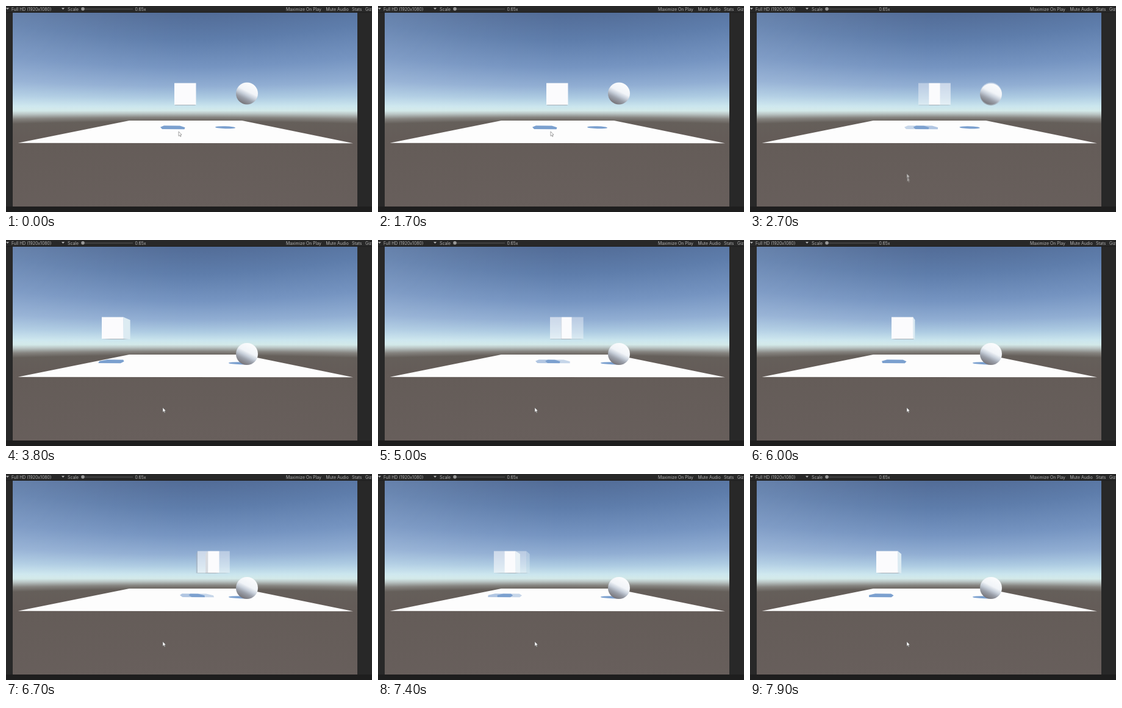
Animation of 600x338 px, one loop 8 s. Source, as an HTML page with a canvas:

```html
<!DOCTYPE html>
<html lang="en">
<head>
<meta charset="utf-8">
<title>Cube and ball</title>
<style>
html, body { margin: 0; width: 100%; height: 100%; overflow: hidden; background: #282828; }
canvas { display: block; width: 600px; height: 338px; }
</style>
</head>
<body>
<canvas id="stage" width="600" height="338"></canvas>
<script>
const view = document.getElementById('stage').getContext('2d');
const buffer = document.createElement('canvas');
buffer.width = 600;
buffer.height = 338;
const ctx = buffer.getContext('2d');

const LOOP = 8000, STEP = 100, START = 2600;
const EYE = { x: 293.5, y: 170 };
const SHADOW = '#7ba0cf';

// [time, cube offset from the middle]
const cubePath = [[START, 0], [2830, 40], [3780, -119], [3800, -119], [4760, 52], [5000, 6],
  [5640, -103], [6000, -44], [6590, 57], [6700, 38], [7580, -118], [7900, -69], [8000, -54]];
const cursorX = [[1900, 283], [2500, 258], [2700, 257]];
const cursorY = [[1900, 206], [2500, 287], [2700, 275]];

function along(keys, t) {
  if (t <= keys[0][0]) return keys[0][1];
  for (let i = 1; i < keys.length; i++) {
    const [t0, a] = keys[i - 1], [t1, b] = keys[i];
    if (t <= t1) return a + (b - a) * (t - t0) / (t1 - t0);
  }
  return keys[keys.length - 1][1];
}

function poly(color, ...pts) {
  ctx.beginPath();
  pts.forEach(([x, y]) => ctx.lineTo(x, y));
  ctx.closePath();
  ctx.fillStyle = color;
  ctx.fill();
}

function rect(color, x, y, w, h) {
  ctx.fillStyle = color;
  ctx.fillRect(x, y, w, h);
}

function label(text, x) {
  ctx.fillStyle = '#b0b0b0';
  ctx.fillText(text, x, 7.6);
}

function stops(gradient, list) {
  list.forEach(([at, color]) => gradient.addColorStop(at, color));
  return gradient;
}

const sky = stops(ctx.createLinearGradient(0, 11, 0, 329), [
  [0, '#526c97'], [0.14, '#5e7dab'], [0.28, '#7594c1'], [0.38, '#91aed3'], [0.44, '#adcbe2'],
  [0.485, '#cbe6ee'], [0.505, '#d3e9e9'], [0.52, '#b9c4c3'], [0.54, '#85837f'],
  [0.56, '#655f5a'], [0.62, '#645c58'], [1, '#685f5c']]);
const glow = stops(ctx.createLinearGradient(11, 0, 300, 0), [
  [0, 'rgba(255,255,255,0.08)'], [1, 'rgba(255,255,255,0)']]);

// the horizon haze widens towards the sides of the lens
function backdrop() {
  for (let x = 11; x < 576; x++) {
    const wide = Math.hypot(1, (x - EYE.x) / 400);
    ctx.save();
    ctx.translate(0, EYE.y * (1 - wide));
    ctx.scale(1, wide);
    rect(sky, x, EYE.y - 159 / wide, 1, 318 / wide);
    ctx.restore();
  }
  rect(glow, 11, 11, 289, 159);
}

function toolbar() {
  ctx.font = '6.9px Inter, sans-serif';
  label('Full HD (1920x1080)', 9);
  label('Scale', 101);
  label('0.65x', 211.5);
  label('Maximize On Play', 459);
  label('Mute Audio', 524.5);
  label('Stats', 567);
  label('Gizmos', 589);
  poly('#b0b0b0', [0, 3], [5, 3], [2.5, 6]);
  poly('#b0b0b0', [91, 3], [96, 3], [93.5, 6]);
  rect('#5a5a5a', 128, 4.5, 80, 1);
  ctx.beginPath();
  ctx.arc(126, 4.8, 2.8, 0, 7);
  ctx.fillStyle = '#999';
  ctx.fill();
}

function scene() {
  rect('#282828', 0, 0, 600, 338);
  rect('#1e1e1e', 0, 10, 600, 1);
  rect('#1e1e1e', 0, 329, 600, 9);
  toolbar();
  backdrop();
  poly('#fdfdfd', [202, 188], [387, 188], [569, 225.3], [19.5, 224.8]);
}

function cubeShadow(off) {
  const far = off * 0.78, mid = off * 0.84, near = off * 0.88;
  poly(SHADOW, [253 + mid, 198.8], [259 + far, 196.3], [285 + far, 196.6],
    [293.5 + mid, 199.3], [292.5 + near, 202.2], [256 + near, 201.9]);
}

function cube(off) {
  const left = 276 + off, right = left + 35.5, top = 126.5, base = 162;
  const back = (x, y) => [EYE.x + (x - EYE.x) * 0.89, EYE.y + (y - EYE.y) * 0.89];
  poly('#a9b1b8', [left, base], [right, base], back(right, base), back(left, base));
  if (right < EYE.x) poly('#dcebf2', [right, top], back(right, top), back(right, base), [right, base]);
  if (left > EYE.x) poly('#a8b0ba', [left, top], back(left, top), back(left, base), [left, base]);
  poly('#fbfbfd', [left, top], [right, top], [right, base], [left, base]);
}

function ballShadow(drop) {
  ctx.beginPath();
  ctx.ellipse(359.5 + 24.5 * drop, 199.3 + 3 * drop, 16.5 + 2.5 * drop, 2, 0.03, 0, 7);
  ctx.fillStyle = SHADOW;
  ctx.fill();
}

function ball(drop) {
  const x = 395, y = 143.5 + 43.5 * drop;
  ctx.beginPath();
  ctx.arc(x, y, 18, 0, 7);
  ctx.fillStyle = stops(ctx.createLinearGradient(x + 8, y - 16, x - 8, y + 16), [
    [0, '#fbfcfd'], [0.4, '#f1f4f8'], [0.58, '#c6ced9'], [0.75, '#9a9fa9'], [1, '#77757a']]);
  ctx.fill();
}

function cursor(x, y) {
  ctx.beginPath();
  [[0, 0], [0, 7.4], [1.7, 5.9], [2.8, 8.4], [4, 7.9], [2.9, 5.4], [5, 5.2]]
    .forEach(([dx, dy]) => ctx.lineTo(x + dx, y + dy));
  ctx.closePath();
  ctx.fillStyle = '#fff';
  ctx.fill();
  ctx.strokeStyle = '#666';
  ctx.lineWidth = 0.6;
  ctx.stroke();
}

function paint(t) {
  const fall = Math.max(0, t - START) / 500;
  const drop = Math.min(1, fall * fall);
  const off = along(cubePath, t);
  scene();
  cubeShadow(off);
  ballShadow(drop);
  cube(off);
  ball(drop);
  cursor(along(cursorX, t), along(cursorY, t));
}

function show(t, alpha) {
  paint(t);
  view.globalAlpha = alpha;
  view.drawImage(buffer, 0, 0);
}

function draw(t) {
  // some steps are a mix of two neighbouring moments
  const mixed = t > START && (t / STEP) % 8 < 4;
  if (mixed) show(t - STEP, 1);
  show(t, mixed ? 0.58 : 1);
}

const begin = performance.now();
let shown = -1;
function tick() {
  const t = Math.floor((performance.now() - begin) % LOOP / STEP) * STEP;
  if (t !== shown) draw(shown = t);
  requestAnimationFrame(tick);
}
tick();
</script>
</body>
</html>
```
